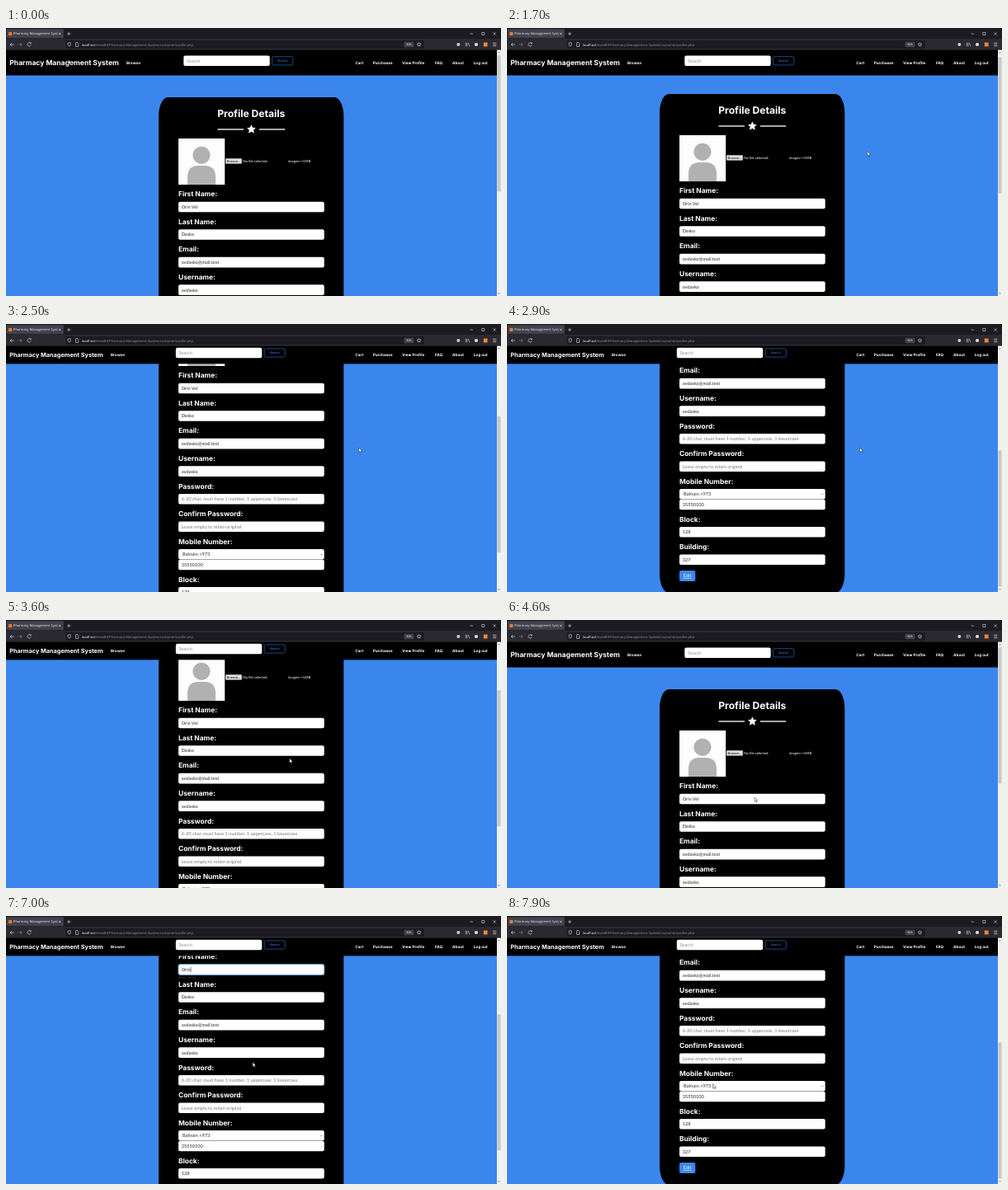
Write an HTML page that moves like this. It is 600 px wide and 325 px high and loops after 8000 ms.

```html
<!DOCTYPE html>
<html lang="en">
<head>
<meta charset="utf-8">
<title>Profile page</title>
<style>
html, body { margin: 0; width: 100%; height: 100%; overflow: hidden; background: #000; }
svg { display: block; width: 600px; height: 325px; text-rendering: geometricPrecision; }
text { white-space: pre; }
.b { font-family: Inter, "Open Sans", sans-serif; font-weight: 700; fill: #fff; }
.l { font-family: Lato, sans-serif; }
.o { font-family: "Open Sans", "Noto Sans", sans-serif; }
.i { fill: none; stroke: #e4e4ea; stroke-width: .6; }
</style>
</head>
<body>
<svg id="stage" viewBox="0 0 600 325"></svg>
<script>
const BLUE = '#3b86ec', INK = '#25282c', GREY = '#6f7780';
const text = (x, y, size, str, cls, fill, more = '') =>
  `<text x="${x}" y="${y}" font-size="${size}" class="${cls}" ${fill ? `fill="${fill}"` : ''} ${more}>${str}</text>`;
const rect = (x, y, w, h, fill, r = 0, more = '') =>
  `<rect x="${x}" y="${y}" width="${w}" height="${h}" rx="${r}" fill="${fill}" ${more}/>`;
const line = (d, more = '') => `<path d="${d}" class="i" ${more}/>`;
const dot = (x, y, r, fill) => `<circle cx="${x}" cy="${y}" r="${r}" fill="${fill}"/>`;

const star = (cx, cy, r) => Array.from({ length: 10 }, (_, k) => {
  const a = k * Math.PI / 5 - Math.PI / 2, q = k % 2 ? r * .48 : r;
  return `${cx + q * Math.cos(a)},${cy + q * Math.sin(a)}`;
}).join(' ');

// An input box centred on y
const box = (y, str, fill = INK, id = '') =>
  rect(209, y - 6.3, 176.7, 12.6, '#fff', 2, id && `id="${id}Box"`) +
  text(212.7, y + 1.9, 5.6, str, 'l', fill, id && `id="${id}"`);
const label = (y, str) => text(209, y + 3, 8.4, str, 'b');

const fields = [
  ['First Name:', 'Orin Vel', INK, 'first'],
  ['Last Name:', 'Dasko'],
  ['Email:', 'ovdasko@mail.test'],
  ['Username:', 'ovdasko'],
  ['Password:', '6-20 char, must have 1 number, 1 uppercase, 1 lowercase', GREY],
  ['Confirm Password:', 'Leave empty to retain original', GREY],
].map(([name, ...rest], k) => label(201.3 + k * 33.55, name) + box(217 + k * 33.55, ...rest)).join('');

const page = `<g id="page">
  <rect x="185" y="84" width="224.3" height="454" rx="11.2" ry="22.7"/>
  ${text(297.3, 108, 12.1, 'Profile Details', 'b', '', 'text-anchor="middle"')}
  ${rect(256.5, 122.3, 31.5, 1.3, '#fff')}${rect(307, 122.3, 31.2, 1.3, '#fff')}
  <polygon points="${star(297.4, 123, 5.2)}" fill="#fff" stroke="#fff" stroke-width=".5" stroke-linejoin="round"/>
  ${rect(209, 134, 56.2, 56, '#fdfdfd')}${dot(237, 154.3, 10.6, '#b1b1b1')}
  <path d="M220 190V181Q220 167 233 167H241Q254 167 254 181V190Z" fill="#b1b1b1"/>
  ${rect(266.2, 158.3, 19.6, 6.2, '#e3e3e6', .8, 'stroke="#8f8f9d" stroke-width=".4"')}
  ${text(267.6, 162.9, 4.2, 'Browse...', 'l', '#111')}
  ${text(287.2, 162.9, 4.3, 'No file selected.', 'l', '#fff')}
  ${text(342, 162.9, 4.3, 'images&lt;=5MB', 'l', '#fff')}
  ${fields}
  <g id="edit">${line('M0 213.8V220', 'id="caret" style="stroke:#222"')}
    ${text(209, 228.4, 4.2, 'Input Valid!', 'l', '#3c4216', 'id="hint"')}</g>
  ${label(402.8, 'Mobile Number:')}${box(418.3, ' Bahrain +973')}${box(431, '35550100')}
  ${line('M381.2 417.9l1.2 1.2 1.2-1.2', 'style="stroke:#555"')}
  ${label(449, 'Block:')}${box(464.3, '128')}
  ${label(482.3, 'Building:')}${box(497.7, '327')}
  ${rect(209, 511, 19.3, 13, BLUE, 2)}
  ${text(218.6, 519.4, 5.6, 'Edit', 'l', '#fff', 'text-anchor="middle" text-decoration="underline"')}
</g>`;

const links = [[423.3, 'Cart'], [444.7, 'Purchases'], [480, 'View Profile'],
  [520, 'FAQ'], [541, 'About'], [566.7, 'Log out']];
const nav = `${rect(0, 26, 595, 31.5, '#000', 0, 'id="bar"')}
  ${text(4.3, 45, 8.54, 'Pharmacy Management System', 'b', '', 'id="brand"')}
  <g id="menu">${links.map(([x, s]) => text(x, 43.6, 4.65, s, 'b')).join('')}
    ${text(146, 43.6, 4.65, 'Browse', 'b', '', 'id="browse"')}</g>
  <g id="search">${rect(215.3, 33.6, 104.4, 12.5, '#fff', 2)}
    ${text(219, 41.8, 5.6, 'Search', 'l', '#8a9198')}
    ${rect(322.6, 34.7, 25.2, 10.2, 'none', 1.6, 'stroke="#2467b8" stroke-width=".7"')}
    ${text(335.2, 41.3, 4.2, 'Search', 'l', '#2f80dd', 'text-anchor="middle"')}</g>`;

const scrollbar = `${rect(595, 26, 5, 299, '#f0f0f0')}
  ${rect(595.4, 33.3, 4.2, 165, '#c9c9cb', 0, 'id="thumb"')}
  ${line('M596.2 30.6l1.3-1.4 1.3 1.4M596.2 321l1.3 1.4 1.3-1.4', 'style="stroke:#555"')}`;

const chrome = `${rect(0, 0, 600, 13.5, '#1c1b22')}${rect(0, 13, 600, 13.6, '#2b2a33')}
  ${rect(.8, 1.2, 69, 11, '#42414d', 1.2)}${dot(5.2, 7, 2.3, '#f47a2a')}
  <svg x="9" width="53.5" height="13">${text(0, 8.4, 4, 'Pharmacy Management System', 'o', '#f4f4f6')}</svg>
  ${line('M64 5.7l2.4 2.4m0-2.4l-2.4 2.4M74 7h4.2M76.1 4.9v4.2')}
  ${line('M562.5 7h3.4M576.8 5.4h3v3h-3zM590.8 5.4l3 3m0-3l-3 3')}
  ${line('M9.8 20H5.2m2-2l-2 2 2 2')}
  ${line('M14.6 20h4.6m-2-2l2 2-2 2', 'opacity=".5"')}
  ${line('M30 18.6a2.2 2.2 0 1 0 .2 2.2M30.3 17.3v1.6h-1.6')}
  ${rect(72.5, 15, 434.5, 10, '#1c1b22', 1.4)}
  ${line('M74.8 18.2l1.8-.7 1.8.7q0 3-1.8 4.3-1.8-1.3-1.8-4.3zM84.6 17.6h2.2l1 1v3.8h-3.2z')}
  ${text(91.7, 21.5, 4.05, 'localhost<tspan fill="#96959f">/itse489/Pharmacy-Management-System/customer/profile.php</tspan>', 'o', '#fbfbfe')}
  ${rect(482.5, 16.7, 11.8, 6.6, '#42414d', 1.4)}
  ${text(488.4, 21.3, 3.3, '90%', 'o', '#fff', 'text-anchor="middle"')}
  <polygon points="${star(500.5, 20.1, 2.4)}" class="i"/>
  ${dot(548.3, 20, 2, '#c9c9d0')}
  ${line('M557.3 17.8v4.4m1.6-4.4v4.4m1.4-4.2l1.4 4.2')}
  ${dot(570, 20, 2.1, '#dcdce2')}${rect(578.8, 17.6, 4.8, 4.8, '#f08a35')}
  ${line('M590.2 18.2h4.2m-4.2 1.8h4.2m-4.2 1.8h4.2')}`;

const pointer = `<path id="pointer" d="M0 0V5.4L1.3 4.3 2.2 6.2 3 5.8 2.2 4 3.8 3.9Z" fill="#fff" stroke="#111" stroke-width=".45"/>`;

const stage = document.getElementById('stage');
stage.innerHTML = rect(0, 0, 600, 325, BLUE) + page + nav + scrollbar + chrome + pointer;
const $ = id => document.getElementById(id);
const set = (id, props) => Object.entries(props).forEach(([k, v]) => $(id).setAttribute(k, v));

// Linear track through [time, value] points
const track = (...pts) => t => {
  const k = pts.findIndex(p => p[0] > t);
  if (k < 0) return pts[pts.length - 1][1];
  if (!k) return pts[0][1];
  const [a, u] = pts[k - 1], [b, v] = pts[k];
  return u + (v - u) * (t - a) / (b - a);
};
const scroll = track([1650, 0], [1700, 4], [2500, 139], [2900, 212], [3200, 212],
  [3600, 92], [4000, 0], [6200, 0], [6300, 2], [7000, 152], [7400, 212]);
const shrink = track([1700, 0], [2000, 1], [4000, 1], [4300, 0], [6300, 0], [6600, 1]);
const pointerX = track([200, 75.5], [900, 436.8], [1700, 436.8], [2500, 427.6], [3000, 427.6],
  [3600, 343.7], [4500, 300], [5600, 300], [6100, 299], [7000, 299], [7700, 249.6]);
const pointerY = track([200, 38.5], [900, 149.6], [1700, 149.6], [2500, 150], [3000, 150],
  [3600, 167.8], [4500, 215], [5600, 215], [6100, 177.4], [7000, 177.4], [7700, 203.6]);

function draw(t) {
  const s = scroll(t), n = shrink(t);
  set('page', { transform: `translate(0 ${-s})` });
  set('thumb', { y: 33.3 + s * .566 });
  set('bar', { height: 31.5 - 9.2 * n });
  set('brand', { y: 45 - 4.6 * n, 'font-size': 8.54 - 1.24 * n });
  set('menu', { transform: `translate(0 ${-4.4 * n})` });
  set('browse', { x: 146 - 19 * n });
  set('search', { transform: `translate(${-9.5 * n} ${-4.8 * n})` });
  set('pointer', { transform: `translate(${pointerX(t)} ${pointerY(t)})` });

  const focused = t >= 4700;
  const erased = Math.max(0, Math.min(4, Math.floor((t - 5000) / 150) + 1));
  $('first').textContent = 'Orin Vel'.slice(0, 8 - erased);
  set('firstBox', { stroke: focused ? '#86b7fe' : 'none', 'stroke-width': 1 });
  set('caret', {
    transform: `translate(${213.1 + $('first').getComputedTextLength()} 0)`,
    visibility: focused ? 'visible' : 'hidden'
  });
  set('hint', { visibility: erased ? 'visible' : 'hidden' });
}

const start = performance.now();
function tick() {
  draw(Math.floor((performance.now() - start) % 8000 / 100) * 100);
  requestAnimationFrame(tick);
}
tick();
</script>
</body>
</html>
```
